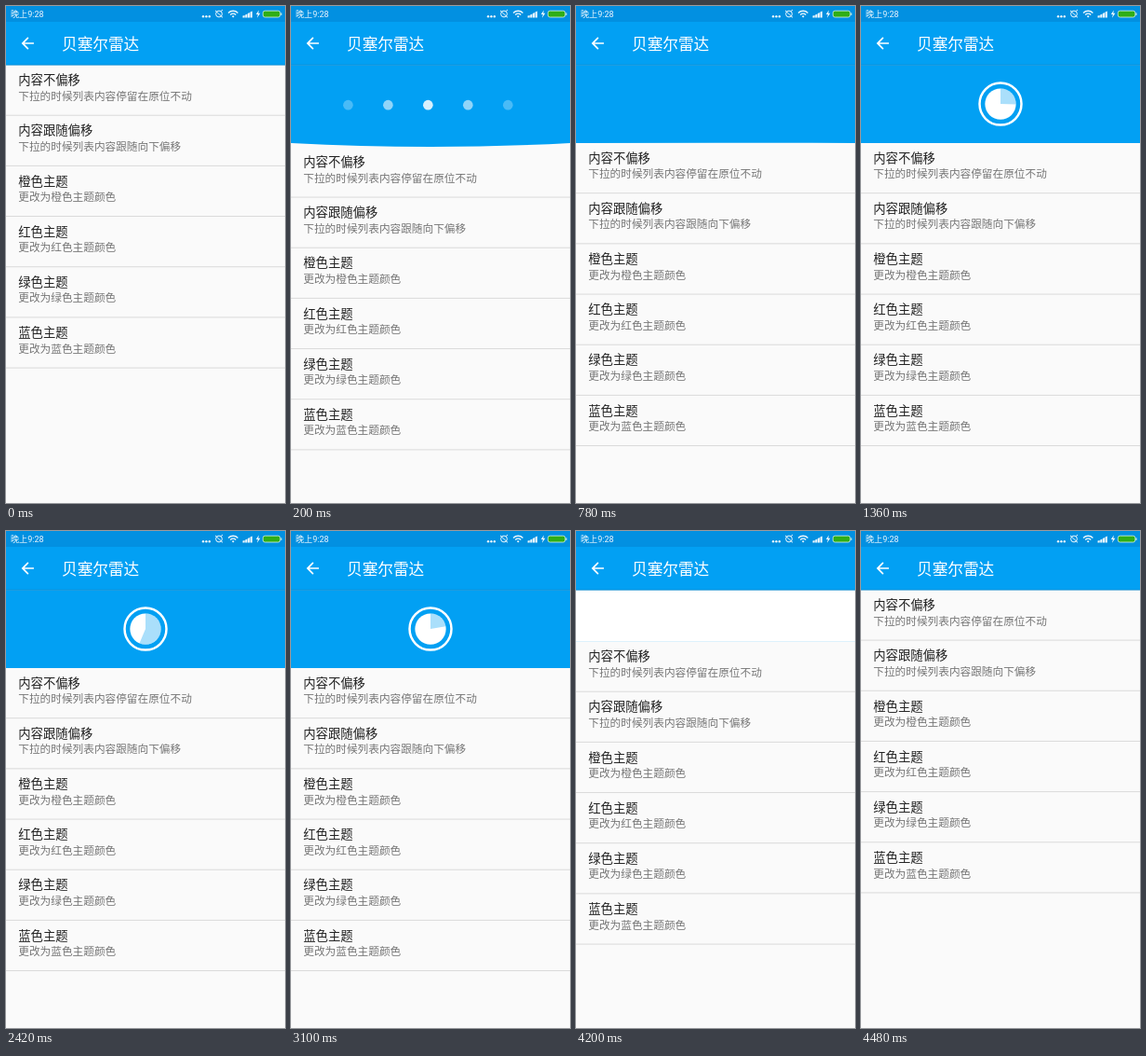
These frames come from a looping animation (300x533 px, 4500 ms). An HTML page:

```html
<!DOCTYPE html>
<html lang="zh-CN">
<head>
<meta charset="utf-8">
<title>贝塞尔雷达</title>
<style>
  html, body { margin: 0; width: 100%; height: 100%; overflow: hidden; background: #fafafa; }
  svg { display: block; width: 100vw; height: 100vh; font-family: Roboto, "Noto Sans CJK SC", "Noto Sans CJK", sans-serif; }
</style>
</head>
<body>
<svg viewBox="0 0 300 533" preserveAspectRatio="none">
  <defs><clipPath id="clip"><rect id="clipBox" width="300" height="0"/></clipPath></defs>
  <rect width="300" height="533" fill="#fafafa"/>
  <g transform="translate(0 63.3)">
    <g clip-path="url(#clip)">
      <path id="wave" fill="#02a0f3"/>
      <g id="dots" fill="#fff"></g>
      <g id="radar">
        <circle id="disc" cx="150" fill="#fff"/>
        <circle id="ring" cx="150" fill="none" stroke="#fff"/>
        <path id="wedge" fill="#02a0f3" fill-opacity=".333"/>
      </g>
      <circle id="ripple" cx="150" fill="#fff"/>
    </g>
  </g>
  <g id="list"></g>
  <rect width="300" height="63" fill="#02a0f3"/>
  <rect y="62.700" width="300" height="1" fill="#0284cc" fill-opacity=".75"/>
  <rect width="300" height="17" fill="#0290e1"/>
  <path transform="translate(13.3 30) scale(.833)" fill="#fff" d="M20 11H7.83l5.59-5.59L12 4l-8 8 8 8 1.41-1.41L7.83 13H20z"/>
  <text x="60" y="46.7" font-size="16.67" fill="#fff">贝塞尔雷达</text>
  <text x="5" y="12.4" font-size="9.1" fill="#fff" fill-opacity=".92">晚上9:28</text>
  <g fill="#fff" fill-opacity=".92">
    <circle cx="212" cy="11.3" r="1.2"/><circle cx="215.4" cy="11.3" r="1.2"/><circle cx="218.800" cy="11.3" r="1.2"/>
    <path d="M238.500 7a8 8 0 0 1 11.400 0l-1 1.100a6.500 6.500 0 0 0-9.400 0zM240.700 9a5 5 0 0 1 7 0l-1 1.100a3.500 3.500 0 0 0-5 0zM242.800 11a2 2 0 0 1 2.800 0l-1.400 1.500z"/>
    <path d="M254.500 12.600v-2l2.200-.7v2.700zM257.200 12.600v-3l2.200-1v4zM259.900 12.600v-4.500l2.200-1v5.500zM262.600 12.600v-6l2.200-1.200v7.200z"/>
    <path d="M271.800 4.500l-3 4.600h2l-.8 3.700 3.400-5h-2.100z"/>
  </g>
  <g fill="none" stroke="#fff" stroke-opacity=".92">
    <circle cx="229" cy="8.500" r="3.400"/>
    <path d="M225 4.800l8 7.600M231.200 5.500l1.800-1.500"/>
  </g>
  <rect x="276.300" y="5.200" width="18.500" height="6.800" rx="2.200" fill="#2fae16" stroke="#d9f3e0" stroke-width=".8"/>
  <rect x="295.300" y="7.300" width="1.200" height="2.700" rx=".5" fill="#d9f3e0"/>
</svg>
<script>
const LOOP = 4500, W = 300, HEAD = 83.6, PULL = 125.4;
const RELEASE = 368, GROW = 790, SPIN = 1065, FINISH = 3785, RETURN = 4072, SETTLE = 325;
const NS = "http://www.w3.org/2000/svg";
const $ = id => document.getElementById(id);
const set = (el, attrs) => { for (const k in attrs) el.setAttribute(k, attrs[k]); };
const add = (parent, tag, attrs, text) => {
  const el = document.createElementNS(NS, tag);
  set(el, attrs);
  if (text) el.textContent = text;
  return parent.appendChild(el);
};
const part = (t, from, length) => Math.min(1, Math.max(0, (t - from) / length));
const smooth = u => (1 - Math.cos(Math.PI * u)) / 2;

const items = [["内容不偏移", "下拉的时候列表内容停留在原位不动"], ["内容跟随偏移", "下拉的时候列表内容跟随向下偏移"]];
for (const c of "橙红绿蓝") items.push([c + "色主题", `更改为${c}色主题颜色`]);
items.forEach(([title, note], i) => {
  const y = 63.3 + i * 54.17;
  add($("list"), "text", { x: 13.3, y: y + 20.9, "font-size": 13.33, fill: "#212121" }, title);
  add($("list"), "text", { x: 13.3, y: y + 37.4, "font-size": 11.67, fill: "#757575" }, note);
  add($("list"), "rect", { x: 0, y: y + 53.3, width: W, height: 1, fill: "#dadada" });
});
const dots = [-2, -1, 0, 1, 2].map(index => ({ index, el: add($("dots"), "circle", {}) }));

function pullAt(t) {
  if (t < RELEASE) return PULL * Math.sin(Math.PI / 2 * part(t, 0, 365)) ** 1.3;
  if (t < RETURN) return PULL + (HEAD - PULL) * smooth(part(t, RELEASE, SETTLE));
  return HEAD * (1 - smooth(part(t, RETURN, SETTLE)));
}

// Damped swing of the lower edge after release
function waveAt(t, pull) {
  if (t < RELEASE) return 1.9 * Math.max(0, pull - HEAD);
  const u = part(t, RELEASE, 906), p = 5 * (1 - (1 - u) ** 1.5);
  const keys = [1, 0, -0.8, 0, -0.4, 0], i = Math.min(4, Math.floor(p));
  return 1.9 * (PULL - HEAD) * (keys[i] + (keys[i + 1] - keys[i]) * (p - i));
}

function drawDots(t, pull) {
  const f = pull / HEAD, over = f > 1 ? (f - 1) / f : 0;
  const gap = W / 7 * (f - over), dp = pull * 1.2;
  const r = 5.83 * (1 - 1 / (dp / 10 + 1));
  const fade = (1 - smooth(part(t, RELEASE, 366))) * (1 - (dp / 800 + 1) ** -15);
  for (const { index, el } of dots) {
    set(el, {
      cx: W / 2 - r / 2 + gap * index, cy: pull * (1 - over / 2) / 2, r,
      "fill-opacity": fade * (1 - Math.abs(index) / 3)
    });
  }
}

function drawRadar(t, cy) {
  const scale = smooth(part(t, GROW, SPIN - GROW)), r = 16.67 * scale;
  $("radar").style.display = scale > 0 ? "" : "none";
  set($("disc"), { cy, r });
  set($("ring"), { cy, r: 22.5 * scale, "stroke-width": 2.5 * Math.min(1, scale * 4) });
  const a = 2 * Math.PI * smooth(Math.max(0, t - SPIN) / 880 % 1);
  const x = 150 + r * Math.sin(a), y = cy - r * Math.cos(a);
  set($("wedge"), { d: a > 0.001 ? `M150 ${cy}V${cy - r}A${r} ${r} 0 ${a > Math.PI ? 1 : 0} 1 ${x} ${y}Z` : "" });
}

function draw(t) {
  const pull = pullAt(t), top = Math.min(HEAD, pull);
  set($("list"), { transform: `translate(0 ${pull})` });
  set($("clipBox"), { height: pull });
  set($("wave"), { d: `M0 -1V${top}Q150 ${top + waveAt(t, pull)} ${W} ${top}V-1Z` });
  drawDots(t, pull);
  drawRadar(t, pull / 2);
  set($("ripple"), { cy: pull / 2, r: 311 * smooth(part(t, FINISH, RETURN - FINISH)) });
}

const start = performance.now();
function tick(now) {
  draw(Math.max(0, now - start) % LOOP);
  requestAnimationFrame(tick);
}
draw(0);
requestAnimationFrame(tick);
</script>
</body>
</html>
```
